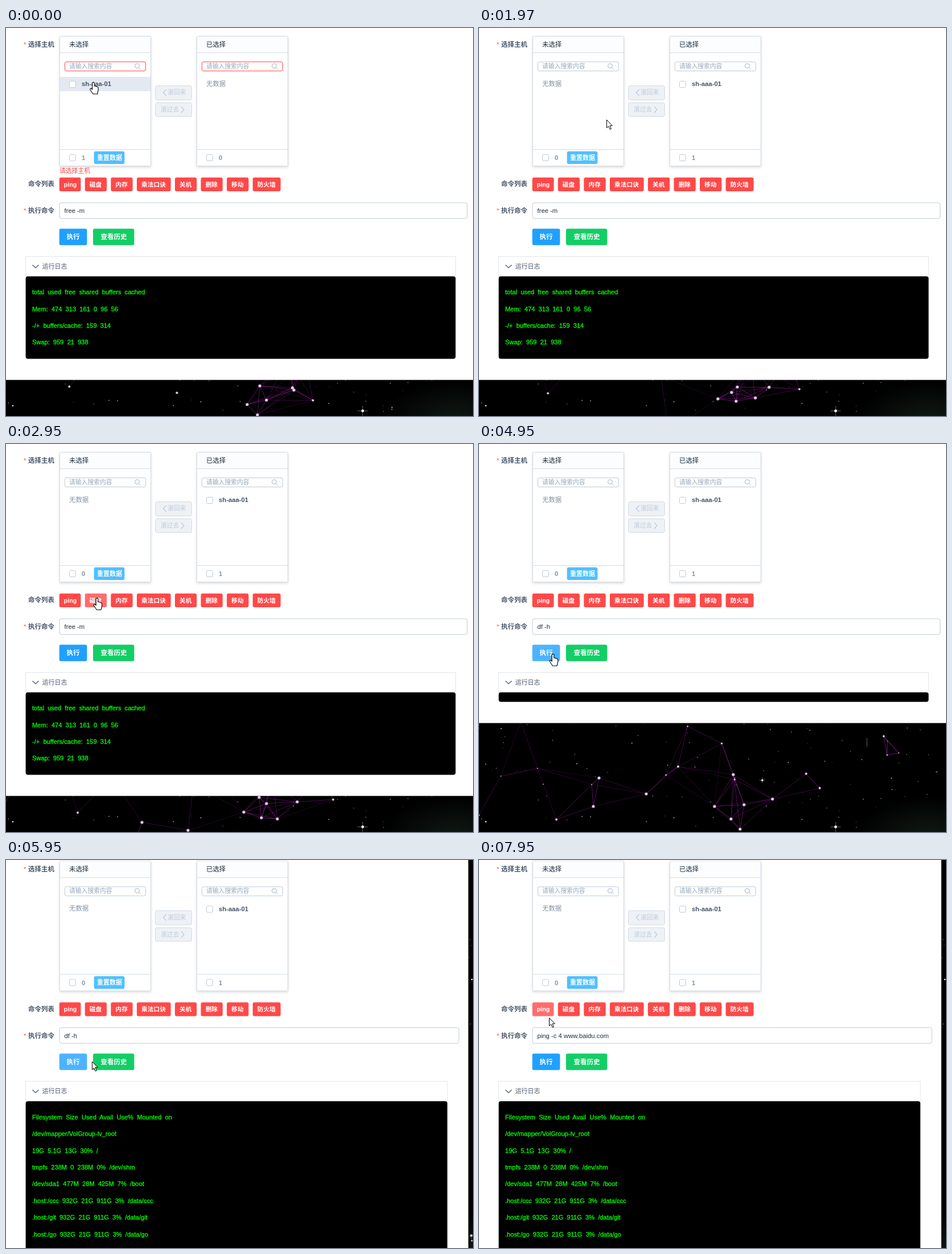
Recreate the animation shown at these times as an HTML page. Size 821 px wide and 682 px high, loop 8 s.

```html
<!DOCTYPE html>
<html lang="zh">
<head>
<meta charset="utf-8">
<style>
html, body { margin: 0; width: 100%; height: 100%; overflow: hidden; background: #000; }
svg { display: block; }
text { font-family: "Liberation Sans", "Noto Sans CJK SC", "Noto Sans CJK", sans-serif; white-space: pre; }
.panel { filter: drop-shadow(0 2px 2px rgba(0,0,0,.14)); }
.log { stroke: #0f0; stroke-width: .35px; }
</style>
</head>
<body>
<svg id="stage" width="821" height="682" viewBox="0 0 821 682"></svg>
<script>
const stage = document.getElementById('stage');
const LOOP = 8000;
const RED = '#ff4949', LINE = '#d1dbe5', GREY = '#8391a5', DARK = '#48576a', INK = '#1f2d3d';

const text = (x, cy, s, size = 11.3, fill = DARK, weight = 400) =>
  `<text x="${x}" y="${cy + size * .36}" font-size="${size}" fill="${fill}" font-weight="${weight}">${s}</text>`;
// Filled box given by its outer edges
const box = (x0, y0, x1, y1, fill, r = 0) =>
  `<rect x="${x0}" y="${y0}" width="${x1 - x0}" height="${y1 - y0}" rx="${r}" fill="${fill}"/>`;
// Box with a one-pixel border
const frame = (x0, y0, x1, y1, stroke, fill = '#fff', r = 0) =>
  `<rect x="${x0 + .5}" y="${y0 + .5}" width="${x1 - x0 - 1}" height="${y1 - y0 - 1}" rx="${r}" fill="${fill}" stroke="${stroke}"/>`;
const path = (d, stroke, fill = 'none', w = 1) =>
  `<path d="${d}" fill="${fill}" stroke="${stroke}" stroke-width="${w}" stroke-linejoin="round"/>`;
const dot = (x, y, r, fill, o = 1) => `<circle cx="${x}" cy="${y}" r="${r}" fill="${fill}" opacity="${o}"/>`;
const button = (x0, y0, x1, y1, fill, label, tx, size) =>
  box(x0 - .3, y0 - .3, x1 + .4, y1 + .4, fill, 3) + text(tx, (y0 + y1) / 2, label, size, '#fff', 700);

// ---- night sky ----
let seed = 7;
const rnd = (lo, hi) => lo + (hi - lo) * (seed = seed * 16807 % 2147483647) / 2147483647;
const many = (n, make) => Array.from({ length: n }, make);

const sky = `<defs><radialGradient id="glow"><stop stop-color="#101a15"/><stop offset="1" stop-color="#101a15" stop-opacity="0"/></radialGradient></defs>
  <rect width="821" height="682"/><ellipse cx="790" cy="690" rx="130" ry="70" fill="url(#glow)"/>` +
  many(420, () => dot(rnd(0, 821), rnd(0, 682), rnd(.4, 1), '#fff', rnd(.2, .75))).join('') +
  dot(12, 664, 1.2, '#fff') + dot(498, 591, 1.7, '#fff') + dot(627, 673, 2.4, '#fff') + dot(819, 210, 1.3, '#fff') +
  path('M618 673H636M627 664V682M493 591H503M498 586V596M682 517V532', '#ffffff80', 'none', .8);

// Drifting particles: place at REST seconds and speed per second; loose ones fill the rest of the sky
const REST = 4.95, REACH = 112;
const particles = [
  [516, 624, 2, -2.5], [443, 659, -3, 1], [459, 677, -9, 9], [466, 634, 4, 1], [414, 637, -2, -5],
  [447, 581, 1, -20], [294, 615, -13, -32], [211, 587, -14, -39], [201, 637, -13, -30], [350, 567, 10, -15],
  [599, 605, 12, -10], [718, 522, 8, -30], [738, 543, 12, -25], [136, 660, 5, 6]
].concat(many(14, () => [rnd(-20, 840), rnd(480, 700), rnd(-12, 12), rnd(-12, 12)]))
  .map((p, i) => [...p, i < 9 ? 2.6 : rnd(.7, 2.2)]);

function web(time) {
  const at = particles.map(([x, y, vx, vy, r]) => [x + vx * (time - REST), y + vy * (time - REST), r]);
  const links = at.flatMap(([x, y], i) => at.slice(i + 1).map(([u, v]) => {
    const near = 1 - Math.hypot(u - x, v - y) / REACH;
    return near > 0 ? `<path d="M${x} ${y}L${u} ${v}" stroke="#a320a8" opacity="${.18 + near * .6}"/>` : '';
  }));
  return links.join('') + at.map(([x, y, r]) => dot(x, y, r, '#dccde2')).join('');
}

// ---- form ----
const checkbox = (x, y, on) => frame(x, y, x + 12, y + 12, on ? '#0190fe' : '#bfcbd9', on ? '#20a0ff' : '#fff', 2) +
  (on ? path(`M${x + 3} ${y + 6}l2.3 2.5 4-5`, '#fff', 'none', 1.4) : '');

function panel(x, title, host, count, s) {
  return `<g class="panel">${frame(x, 14, x + 161, 243, LINE, '#fff', 1)}</g>` +
    box(x + 1, 15, x + 160, 44, '#fbfdff') + box(x, 43, x + 160, 44, LINE) + box(x, 213, x + 160, 214, LINE) +
    text(x + 17, 28.5, title, 11.4, INK) +
    frame(x + 9, 59, x + 152, 76, s.invalid ? RED : '#bfcbd9', '#fff', 2.5) +
    text(x + 17, 67, '请输入搜索内容', 10.8, '#97a8be') +
    path(`M${x + 139.5} 69.5l3 3m-2-6a4 4 0 1 0-8 0a4 4 0 1 0 8 0`, '#a3b1c4') +
    (host ? (s.rowHover ? box(x + 1, 86, x + 160, 111, '#e4e8f1') : '') +
      checkbox(x + 17, 93, s.checked) + text(x + 39, 98, 'sh-aaa-01', 11.3, DARK, 700)
      : text(x + 17, 97.5, '无数据', 11.4, GREY)) +
    checkbox(x + 17, 222, s.checked && host) + text(x + 39, 228, count, 11.3, GREY, 700);
}

// Red buttons follow one another, each as wide as its label plus padding
function commandRow(hover) {
  const size = 10.7, pad = 8.1, gap = 8;
  let x = 94;
  return ['ping', '磁盘', '内存', '乘法口诀', '关机', '删除', '移动', '防火墙'].map(name => {
    const left = x, width = (name === 'ping' ? 1.95 : name.length) * size + 2 * pad;
    x += width + gap;
    return button(left, 263, left + width, 286.5, hover === name ? '#ff6d6d' : RED, name, left + pad - .3, size);
  }).join('');
}

const memory = ['total  used  free  shared  buffers  cached', 'Mem:  474  313  161  0  96  56',
  '-/+  buffers/cache:  159  314', 'Swap:  959  21  938'];
const disk = ['Filesystem  Size  Used  Avail  Use%  Mounted  on', '/dev/mapper/VolGroup-lv_root',
  '19G  5.1G  13G  30%  /', 'tmpfs  238M  0  238M  0%  /dev/shm', '/dev/sda1  477M  28M  425M  7%  /boot',
  ...['ccc', 'git', 'go'].map(d => `.host:/${d}  932G  21G  911G  3%  /data/${d}`), ''];

function form(s) {
  const cut = s.scrolled ? 14.5 : 0, moved = s.moved;
  const logEnd = s.log.length ? 463.5 + s.log.length * 29.4 : 453;
  const off = ['#eef1f6', LINE, '#bfcbd9'];
  const [bg, rim, ink] = s.checked ? ['#4db3ff', '#4db3ff', '#fff'] : off;
  const inputRim = s.cursor[0] === 'beam' ? GREY : '#bfcbd9';
  return box(0, -20, s.scrolled ? 812.7 : 821, s.scrolled ? 720 : logEnd + 37.5, '#fff') +
    text(31, 28.5, '*', 11.5, RED) + text(39, 28.5, '选择主机', 11.5, DARK, 700) +
    panel(94, '未选择', !moved, moved ? '0' : s.checked ? '1/1' : '1', s) +
    panel(335, '已选择', moved, moved ? '1' : '0', { invalid: s.invalid }) +
    button(155, 217, 208, 238.6, '#50bfff', '重置数据', 160, 11) +
    frame(262, 101, 327, 127, off[1], off[0], 3) + path('M281.5 108l-5 5.5 5 5.5', off[2], 'none', 1.2) + text(284, 113.5, '滚回来', 10.8, off[2]) +
    frame(262, 131, 327, 156, rim, bg, 3) + text(272, 143.5, '滚过去', 10.8, ink) + path('M308 138l5 5.5 -5 5.5', ink, 'none', 1.2) +
    (s.invalid ? text(94, 251.5, '请选择主机', 10.8, RED) : '') +
    text(39, 274, '命令列表', 11.5, DARK, 700) + commandRow(s.hover) +
    text(31, 321, '*', 11.5, RED) + text(39, 321, '执行命令', 11.5, DARK, 700) +
    frame(93.7, 306.7, 811.2 - cut, 335.3, inputRim, '#fff', 3) + text(102.5, 321, s.cmd, 11.3, INK) +
    button(94, 353, 142, 381.3, s.hover === 'run' ? '#4db3ff' : '#20a0ff', '执行', 106.5, 11.6) +
    button(153.3, 353, 225, 381.3, '#13ce66', '查看历史', 166.5, 11.5) +
    frame(34, 401, 791 - cut, 438, '#dfe6ec') + path('M46.5 416.5l5.5 5 5.5 -5', DARK, 'none', 1.2) +
    text(63.5, 419, '运行日志', 11, DARK) +
    box(34.6, 436.5, 790.4 - cut, logEnd + .3, '#000', 4) +
    `<g class="log">${s.log.map((row, i) => text(46, 464.3 + i * 29.4, row, 11.1, '#0f0')).join('')}</g>`;
}

// ---- pointer ----
const shapes = {
  hand: path('M-1.8 1.2C-1.8 -.6 1.8 -.6 1.8 1.2V6.5Q3.6 5.7 4.4 7.2 6 6.6 6.7 8 8.6 7.7 8.6 10V14L7 20.5H-.5L-5.5 13Q-6 10.2 -3.8 10.5L-1.8 12.5Z', '#000', '#fff', 1.1),
  arrow: path('M.5 .5V14.5L3.7 11.7 6.2 17.2 8.4 16.2 6 10.8H10.4Z', '#000', '#fff'),
  beam: path('M-3 .5H3M0 .5V13.5M-3 13.5H3', '#000', 'none', 1.2)
};
const pointer = ([kind, x, y]) => `<g transform="translate(${x} ${y})">${shapes[kind]}</g>`;

// Each step changes only what differs from the one before
const steps = [
  { at: 0, invalid: true, rowHover: true, cmd: 'free -m', log: memory, cursor: ['hand', 153.5, 95.5] },
  { at: 1000, rowHover: false, checked: true, cursor: ['hand', 293, 146] },
  { at: 1970, invalid: false, checked: false, moved: true, cursor: ['arrow', 224, 161] },
  { at: 2950, hover: '磁盘', cursor: ['hand', 160, 271] },
  { at: 3950, cmd: 'df -h', cursor: ['beam', 172.5, 321] },
  { at: 4950, hover: 'run', log: [], cursor: ['hand', 130, 369.5] },
  { at: 5950, log: disk, scrolled: true, cursor: ['arrow', 151, 354] },
  { at: 6950, cursor: ['arrow', 190, 330] },
  { at: 7950, hover: 'ping', cmd: 'ping -c 4 www.baidu.com', cursor: ['arrow', 123, 277] }
];
steps.forEach((s, i) => { steps[i] = { ...steps[i - 1], ...s }; });

let shown;
function tick() {
  const t = performance.now() % LOOP;
  const s = steps.findLast(k => k.at <= t);
  if (s !== shown) {
    shown = s;
    stage.innerHTML = sky + web(s.at / 1000) +
      `<g transform="translate(0 ${s.scrolled ? -12.5 : 0})">${form(s)}</g>` + pointer(s.cursor);
  }
  requestAnimationFrame(tick);
}
tick();
</script>
</body>
</html>
```
